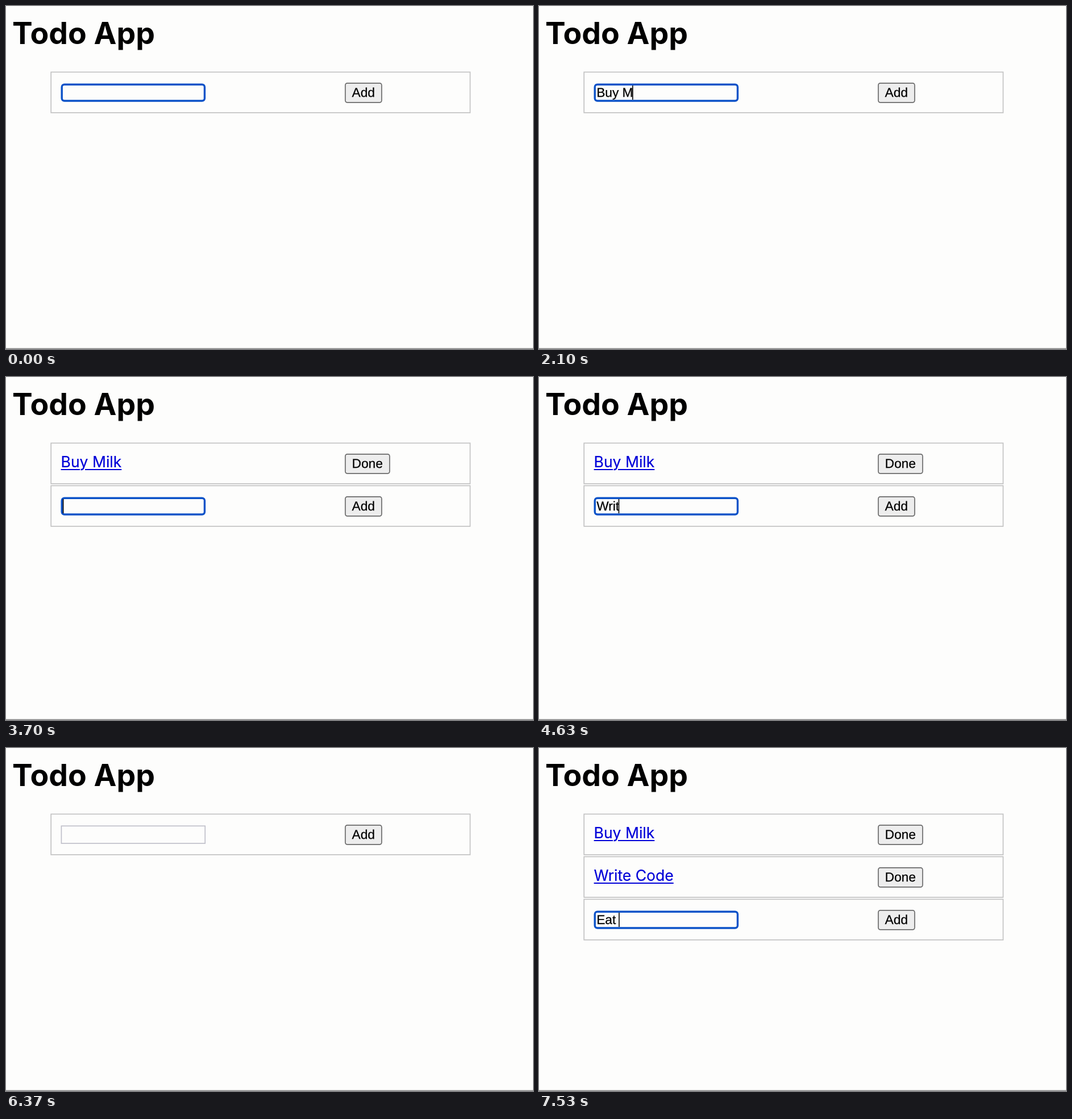
An HTML page for the animation above (8 s loop, 927x604 px).

```html
<!DOCTYPE html>
<html lang="en">
<head>
<meta charset="utf-8">
<title>Todo App</title>
<style>
  html, body { margin: 0; width: 100%; height: 100%; overflow: hidden; background: #fdfdfc; }
  #stage { position: relative; width: 927px; height: 604px; overflow: hidden; }
  svg { position: absolute; left: 0; top: 0; }
  text { font: 22.67px "Liberation Sans", Arial, sans-serif; white-space: pre; text-rendering: geometricPrecision;
         stroke: #000; stroke-width: .25; }
  h1, a { position: absolute; margin: 0; font-family: Inter, sans-serif; white-space: pre; }
  h1 { left: 11px; top: 15px; font-size: 53.5px; line-height: 65px; font-weight: 700; color: #000; }
  a { left: 96.6px; font-size: 26.5px; line-height: 32px; color: #0000d8; -webkit-text-stroke: .2px;
      text-decoration: underline 2px; text-underline-offset: 2.5px; }
  .row { fill: none; stroke: #c3c3c3; stroke-width: 1.7; }
  .button { fill: #ededed; stroke: #6a6a6a; stroke-width: 1.7; }
  .idle { fill: none; stroke: #c0c0ca; stroke-width: 1.7; }
  .focus { fill: none; stroke: #0b52c8; stroke-width: 3.4; }
</style>
</head>
<body>
<div id="stage">
  <svg width="927" height="604">
    <g id="done"></g>
    <g id="form">
      <rect class="row" x="79.2" y="116.4" width="737.2" height="71.5"/>
      <rect id="idle" class="idle" x="97.4" y="137.3" width="252.8" height="30.6"/>
      <rect id="focus" class="focus" x="98.2" y="138.2" width="251.2" height="28.8" rx="4.5"/>
      <text id="typed" x="101.2" y="160"></text>
      <rect id="caret" y="140" width="1.6" height="25"/>
      <rect class="button" x="596.8" y="135.9" width="64" height="34" rx="3.6"/>
      <text x="608.6" y="160">Add</text>
    </g>
    <path d="M0 603.2H927" stroke="#8a8a8a" stroke-width="1.4"/>
  </svg>
  <h1>Todo App</h1>
  <div id="links"></div>
</div>
<script>
  const LOOP = 8000, PITCH = 75, BLINK = 500, TEXT_X = 101.2;
  const todos = ["Buy Milk", "Write Code"];

  // caret: time it first shows; keys: time of each typed character
  const scenes = [
    { at: 0, count: 0, caret: 210, text: "Buy Milk", keys: [700, 830, 960, 1430, 2030, 2200, 2400, 2570] },
    { at: 3030, count: 0 },
    { at: 3330, count: 1, caret: 3330, text: "Write Code",
      keys: [4030, 4300, 4400, 4600, 4700, 4800, 5070, 5270, 5500, 5730] },
    { at: 6060, count: 0 },
    { at: 6500, count: 2, caret: 6500, text: "Eat ", keys: [6830, 7070, 7250, 7500] }
  ];

  const $ = id => document.getElementById(id);
  const show = (el, on) => { el.style.display = on ? "" : "none"; };
  const pen = document.createElement("canvas").getContext("2d");
  pen.font = '22.67px "Liberation Sans", Arial, sans-serif';

  $("done").innerHTML = todos.map((_, i) => `
    <g transform="translate(0 ${i * PITCH})">
      <rect class="row" x="79.2" y="116.4" width="737.2" height="71.5"/>
      <rect class="button" x="596.8" y="135.9" width="78" height="34" rx="3.6"/>
      <text x="608.6" y="160">Done</text>
    </g>`).join("");
  $("links").innerHTML = todos.map((name, i) =>
    `<a style="top:${133 + i * PITCH}px">${name}</a>`).join("");
  const rows = [...$("done").children], links = [...$("links").children];

  function draw(t) {
    const scene = scenes.filter(s => s.at <= t).pop();
    const { count, caret, text = "", keys = [] } = scene;
    const focused = caret !== undefined;
    const pressed = keys.filter(k => k <= t);
    const typed = text.slice(0, pressed.length);
    const age = t - (pressed.length ? pressed[pressed.length - 1] : caret);

    rows.forEach((row, i) => show(row, i < count));
    links.forEach((link, i) => show(link, i < count));
    $("form").setAttribute("transform", `translate(0 ${count * PITCH})`);
    show($("idle"), !focused);
    show($("focus"), focused);
    $("typed").textContent = typed;
    $("caret").setAttribute("x", TEXT_X - 1.4 + pen.measureText(typed).width);
    show($("caret"), focused && age >= 0 && age % (2 * BLINK) < BLINK);
  }

  const start = performance.now();
  function tick() {
    draw((performance.now() - start) % LOOP);
    requestAnimationFrame(tick);
  }
  tick();
</script>
</body>
</html>
```
